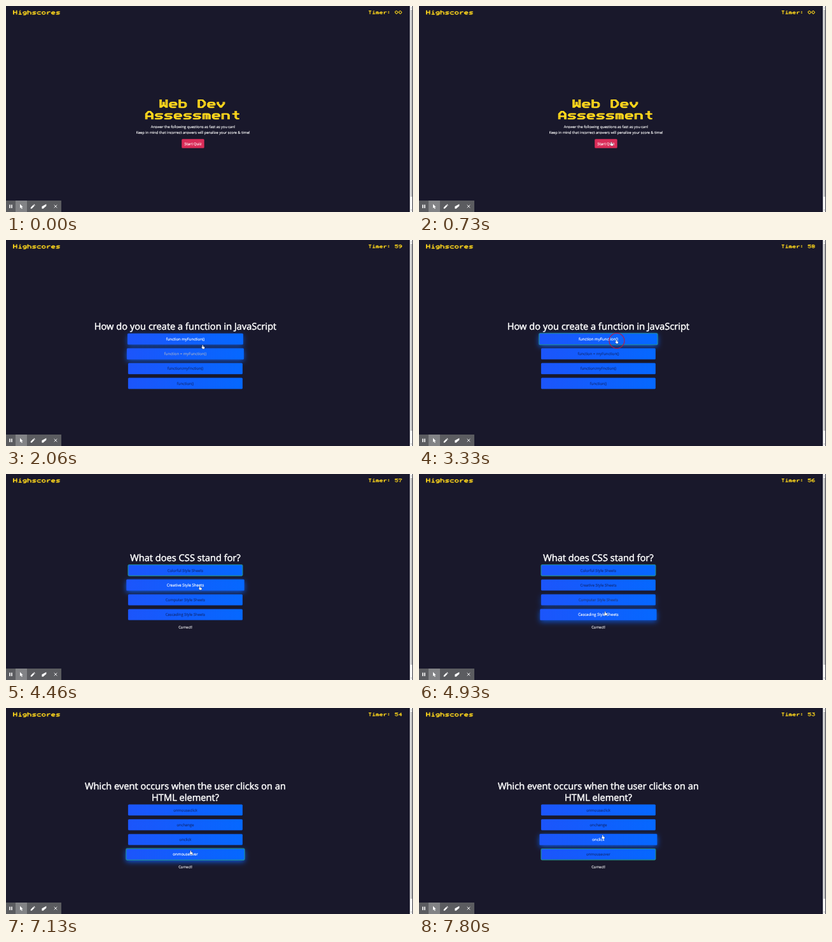
An HTML page with a canvas that plays this animation: 640 px wide and 324 px high, repeating every 8000 ms.

```html
<!DOCTYPE html>
<html lang="en">
<head>
<meta charset="utf-8">
<title>Web Dev Assessment</title>
<style>
  html, body { margin: 0; width: 100%; height: 100%; overflow: hidden; background: #19182b; }
  canvas { display: block; }
</style>
</head>
<body>
<canvas id="stage" width="640" height="324" aria-label="Web Dev Assessment quiz"></canvas>
<script>
const ctx = document.getElementById('stage').getContext('2d');
const LOOP = 8000;
const NIGHT = '#19182b';
const YELLOW = '#ffd81c';
const SANS = '"Open Sans", "Noto Sans", sans-serif';

// Arcade lettering: pen strokes on an 8-unit cell, doubled sideways.
const GLYPHS = {
  H: 'M0 0V6M5 0V6M0 3H5',
  T: 'M1 0H5M3 0V6',
  W: 'M0 0V6L2.5 4L5 6V0M2.5 2V4',
  D: 'M0 0H3L5 2V4L3 6H0Z',
  A: 'M0 6V2L2 0H3L5 2V6M0 4H5',
  b: 'M0 0V6H4L5 5V3L4 2H0',
  c: 'M5 2H1L0 3V5L1 6H5',
  e: 'M0 4H5V3L4 2H1L0 3V5L1 6H4',
  g: 'M5 5H1L0 4V3L1 2H5V6L4 7H1',
  h: 'M0 0V6M0 2H4L5 3V6',
  i: 'M3 0h.1M2 2H3V6M1 6H5',
  m: 'M0 6V2H4L5 3V6M2.6 2V6',
  n: 'M0 6V2H4L5 3V6',
  o: 'M1 2H4L5 3V5L4 6H1L0 5V3Z',
  r: 'M1 2V6M1 4L3 2H5',
  s: 'M5 2H1L0 3L1 4H4L5 5L4 6H0',
  t: 'M1 2H5M3 0V5L4 6H5',
  v: 'M0 2V3L2.5 6L5 3V2',
  ':': 'M2 1V2M2 4V5',
  0: 'M2 0H3L5 2V4L3 6H2L0 4V2Z',
  3: 'M1 0H5L3 2H4L5 3V5L4 6H1L0 5',
  4: 'M4 6V0L0 4H5',
  5: 'M5 0H0V2H4L5 3V5L4 6H1L0 5',
  6: 'M4 0H2L0 2V5L1 6H4L5 5V4L4 3H0',
  7: 'M0 1V0H5V1L2 4V6',
  8: 'M1 0H4L5 1V2L4 3H1L0 4V5L1 6H4L5 5V4L4 3H1L0 2V1Z',
  9: 'M5 3H1L0 2V1L1 0H4L5 1V4L3 6H1'
};
const glyphPaths = {};
for (const ch in GLYPHS) glyphPaths[ch] = new Path2D(GLYPHS[ch]);

const QUESTIONS = [
  {
    start: 860, titleY: 141, top: 155.8,
    title: ['How do you create a function in JavaScript'],
    answers: ['function myFunction()', 'function = myFunction()', 'function:myFnction()', 'function()'],
    focus: { index: 0, from: 3130 },
    hovers: [[2, 1410, 1640], [1, 1640, 1960], [0, 1960, 3400]]
  },
  {
    start: 3400, titleY: 136.6, top: 151.4, feedback: 'Correct!',
    title: ['What does CSS stand for?'],
    answers: ['Colorful Style Sheets', 'Creative Style Sheets', 'Computer Style Sheets', 'Cascading Style Sheets'],
    focus: { index: 0, from: 3400 },
    hovers: [[0, 3400, 4190], [1, 4250, 4620], [2, 4620, 4790], [3, 4790, 6200]]
  },
  {
    start: 6200, titleY: 127.6, top: 160.4, feedback: 'Correct!',
    title: ['Which event occurs when the user clicks on an', 'HTML element?'],
    answers: ['onmouseclick', 'onchange', 'onclick', 'onmouseover'],
    focus: { index: 3, from: 6320 },
    hovers: [[3, 6200, 7500], [2, 7610, LOOP]]
  }
];

const CURSOR = [
  [60, 400, 300], [700, 303, 217], [1130, 303, 217], [1460, 303, 212],
  [1930, 309, 176], [2200, 311, 160], [3800, 311, 160], [4460, 305.5, 179.5],
  [4930, 293.5, 219.5], [5200, 293, 221], [6800, 293, 221],
  [7200, 291, 228], [7800, 289.5, 203]
];
const PRESSES = [[730, 860], [3130, 3400], [6060, 6200]];

const clamp = v => Math.max(0, Math.min(1, v));
const lerp = (a, b, k) => a + (b - a) * k;
const smooth = k => k * k * (3 - 2 * k);

function arcade(text, x, y, size) {
  ctx.save();
  ctx.translate(x, y);
  ctx.scale(size / 8, size / 8);
  ctx.translate(.5, .5);
  ctx.strokeStyle = YELLOW;
  ctx.lineWidth = 1;
  ctx.lineCap = 'square';
  for (const ch of text) {
    if (glyphPaths[ch]) {
      ctx.stroke(glyphPaths[ch]);
      ctx.translate(1, 0);
      ctx.stroke(glyphPaths[ch]);
      ctx.translate(-1, 0);
    }
    ctx.translate(8, 0);
  }
  ctx.restore();
}

// The thin outline brings the regular cut up to a medium weight.
function label(text, x, y, size, color = '#fff', outline = .14) {
  ctx.font = `${size}px ${SANS}`;
  ctx.textAlign = 'center';
  ctx.textRendering = 'geometricPrecision';
  ctx.lineJoin = 'round';
  ctx.lineWidth = outline;
  ctx.fillStyle = ctx.strokeStyle = color;
  ctx.fillText(text, x, y);
  ctx.strokeText(text, x, y);
}

function box(x, y, w, h, r) {
  ctx.beginPath();
  ctx.roundRect(x, y, w, h, r);
}

function rect(x, y, w, h, color) {
  ctx.fillStyle = color;
  ctx.fillRect(x, y, w, h);
}

function shape(path, fill, stroke, width = 1) {
  const p = new Path2D(path);
  if (stroke) {
    ctx.strokeStyle = stroke;
    ctx.lineWidth = width;
    ctx.stroke(p);
  }
  if (fill) {
    ctx.fillStyle = fill;
    ctx.fill(p);
  }
}

function hoverAmount(hovers, index, t) {
  let amount = 0;
  for (const [i, from, to] of hovers) {
    if (i !== index || t < from) continue;
    const peak = clamp((Math.min(t, to) - from) / 270);
    amount = Math.max(amount, peak - clamp((t - to) / 250));
  }
  return amount;
}

function answerButton(text, cy, hover, hovered, focused) {
  const scale = 1 + .035 * smooth(hover);
  const w = 180 * scale, h = 17.4 * scale;
  const x = 282 - w / 2, y = cy - h / 2;
  const fill = ctx.createLinearGradient(x, 0, x + w, 0);
  fill.addColorStop(0, '#1c55fb');
  fill.addColorStop(1, '#0568ff');
  ctx.save();
  ctx.shadowColor = `rgba(13,100,253,${.9 * hover ** .3})`;
  ctx.shadowBlur = 9;
  ctx.shadowOffsetY = 2.5;
  ctx.fillStyle = fill;
  box(x, y, w, h, 1.5);
  ctx.fill();
  ctx.restore();
  ctx.strokeStyle = focused ? '#22908f' : 'rgba(24,70,170,.5)';
  ctx.lineWidth = focused ? 1.1 : .6;
  box(x, y, w, h, 1.6);
  ctx.stroke();
  const k = hovered ? clamp(hover * 5) : hover;
  const color = `rgb(${lerp(18, 255, k)},${lerp(46, 255, k)},${lerp(126, 255, k)})`;
  label(text, 282, cy + 2.1, 5.9 * scale, color);
}

function startScreen() {
  arcade('Web Dev', 241.3, 147, 15);
  arcade('Assessment', 218.8, 165, 15);
  label('Answer the following questions as fast as you can!', 294, 192.2, 5.7);
  label('Keep in mind that incorrect answers will penalize your score & time!', 294, 201.2, 5.7);
  ctx.fillStyle = '#da2d59';
  box(276.3, 209.3, 35.4, 14.3, 1.5);
  ctx.fill();
  label('Start Quiz', 294, 218.7, 5.9);
}

function questionScreen(q, t) {
  q.title.forEach((line, i) => label(line, 282, q.titleY + 18 * i, 14.65, '#fff', .5));
  q.answers.forEach((text, i) => {
    const hovered = q.hovers.some(([n, from, to]) => n === i && t >= from && t < to);
    const focused = i === q.focus.index && t >= q.focus.from;
    answerButton(text, q.top + 23.25 * i, hoverAmount(q.hovers, i, t), hovered, focused);
  });
  if (q.feedback) label(q.feedback, 282, q.top + 91.2, 5.9);
}

function timerText(t) {
  if (t < 1800) return '00';
  return String(59 - Math.floor((t - 1800) / 1000));
}

function scrollbar() {
  rect(635, 0, 4, 324, '#f1f1f1');
  rect(636, 6, 3, 294, '#c1c1c1');
  rect(639, 0, 1, 324, '#3a3a44');
  shape('M636.2 3.4L637.3 2.2L638.4 3.4Z', '#8a8a8a');
  shape('M636.2 320.6L637.3 321.8L638.4 320.6Z', '#8a8a8a');
}

function toolbar() {
  rect(0, 306, 87, 18, '#5b5c60');
  rect(15, 306, 18, 18, '#828386');
  rect(5.2, 312.5, 1.6, 5.4, '#fff');
  rect(8.2, 312.5, 1.6, 5.4, '#fff');
  shape('M22 311.5V318L23.5 316.8L24.7 319.2L25.8 318.6L24.7 316.3H26.7Z', '#fff');
  shape('M38.8 318.7V317L43 312.8L44.7 314.5L40.5 318.7ZM43.5 312.3L44.2 311.6L45.9 313.3L45.2 314Z', '#fff');
  shape('M56.4 315.3L63.4 311.6V314.5L58.5 318.8H56.4Z', '#fff');
  shape('M75.7 312.8L80.3 317.4M80.3 312.8L75.7 317.4', null, '#fff', .9);
}

function cursorAt(t) {
  let i = 1;
  while (i < CURSOR.length - 1 && t > CURSOR[i][0]) i++;
  const [t0, x0, y0] = CURSOR[i - 1], [t1, x1, y1] = CURSOR[i];
  const k = smooth(clamp((t - t0) / (t1 - t0)));
  return [lerp(x0, x1, k), lerp(y0, y1, k)];
}

function cursor(t) {
  if (t < 60) return;
  const [x, y] = cursorAt(t);
  for (const [down, up] of PRESSES) {
    const grow = clamp((t - down) / 120) - clamp((t - up) / 140);
    if (t < down || grow <= 0) continue;
    ctx.strokeStyle = `rgba(195,20,60,${grow})`;
    ctx.lineWidth = 1.1;
    ctx.beginPath();
    ctx.arc(x, y - 1.5, 12 * grow, 0, 7);
    ctx.stroke();
  }
  ctx.save();
  ctx.translate(x, y);
  ctx.lineJoin = 'round';
  shape('M-1.3-2.8Q-.7-3.5-.1-2.8V-.8L1.9-.3Q2.5 0 2.3.8L1.8 2.8H-.7L-2.5.5Q-2.3-.5-1.3.2Z', '#fff', '#20243c', .7);
  ctx.restore();
}

function draw(t) {
  rect(0, 0, 640, 324, NIGHT);
  arcade('Highscores', 11, 6.8, 7.5);
  arcade('Timer: ' + timerText(t), 569.4, 7.4, 6);
  const question = QUESTIONS.filter(q => t >= q.start).pop();
  if (question) questionScreen(question, t);
  else startScreen();
  scrollbar();
  toolbar();
  cursor(t);
}

const began = performance.now();
function tick() {
  draw((performance.now() - began) % LOOP);
  requestAnimationFrame(tick);
}
tick();
</script>
</body>
</html>
```
